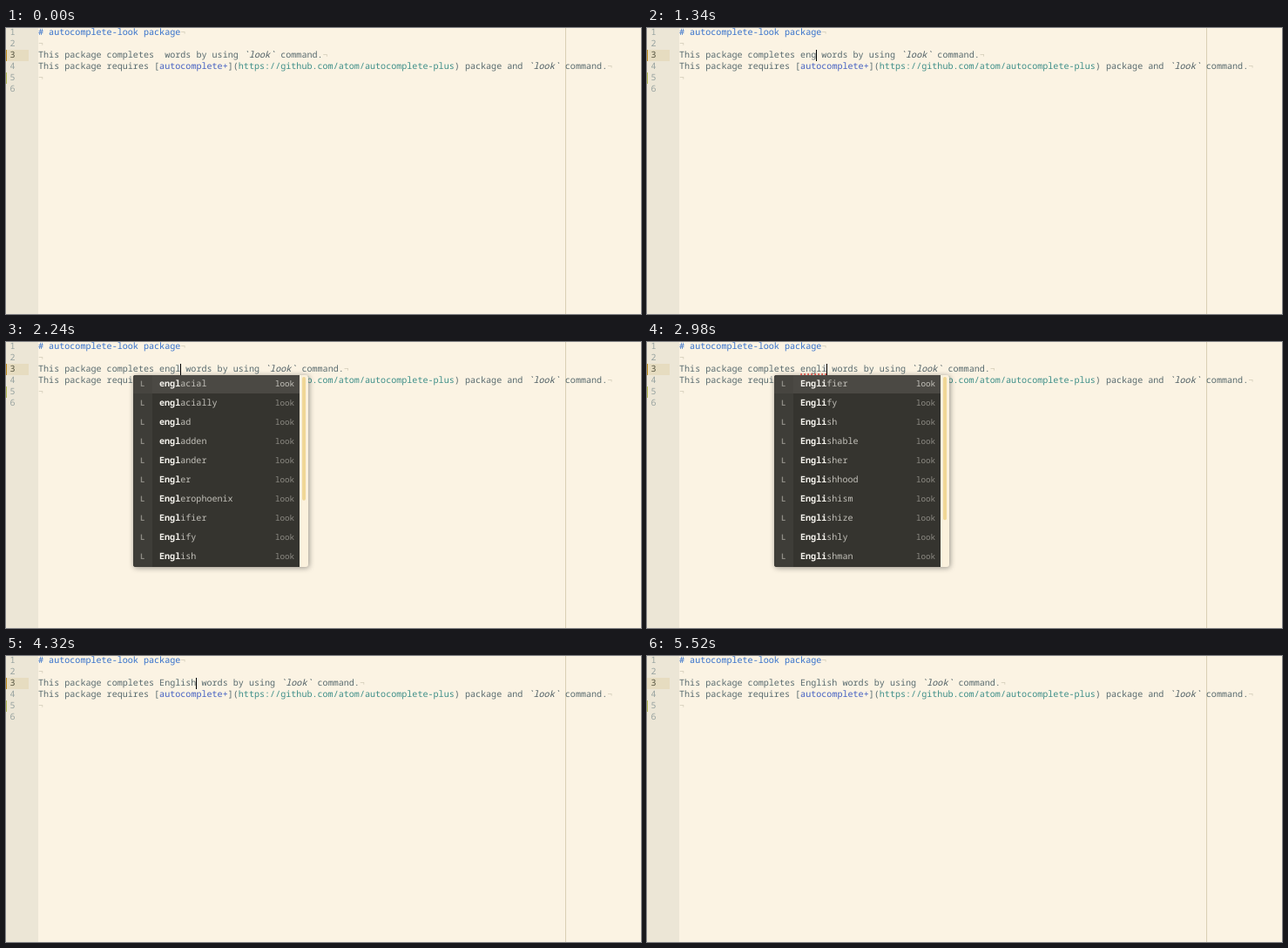
Animation, 729 px wide and 328 px high, one loop 5620 ms. Source, as an HTML page with a canvas:

```html
<!DOCTYPE html>
<html lang="en">
<head>
<meta charset="utf-8">
<title>autocomplete-look</title>
<style>
  html, body { margin: 0; width: 729px; height: 328px; overflow: hidden; background: #fbf3e3; }
  canvas { display: block; }
</style>
</head>
<body>
<canvas id="stage" width="729" height="328"></canvas>
<script>
const ctx = document.getElementById("stage").getContext("2d");

const LOOP = 5620;
const FAMILY = '"Noto Sans Mono", "DejaVu Sans Mono", monospace';
const SIZE = 10.08;
const CELL = SIZE * 0.6;
const LEFT = 37;
const ROW = 13;
const WORD_COLUMN = 23;

const COLOR = {
  page: "#fbf3e3", gutter: "#ece6d6", activeGutter: "#e6dcc0", guide: "#d9cfb4",
  text: "#586a6e", code: "#4b5b61", heading: "#3470cb", link: "#4460c2", url: "#3d8e88",
  invisible: "#d0cab6", number: "#98a3a0", activeNumber: "#55543f",
  modified: "#bd8d20", added: "#b3b954", error: "#d8443c",
  popup: "#35342f", icons: "#3e3d38", selected: "#4b4944", selectedIcon: "#474540",
  match: "#f4f2ec", item: "#c3c1ba", dim: "#8d8b84", selectedDim: "#c6c4bd",
  track: "#fbf1dd", thumb: "#f0d796"
};

// Each entry: time, text typed so far.
const TYPING = [[0, ""], [450, "e"], [750, "en"], [1340, "eng"], [2240, "engl"],
  [2680, "engli"], [3430, "englis"], [4320, "English"]];
const CURSOR_OFF = [[0, 450], [1790, 2240], [3130, 3430], [3870, 4320], [4770, 5070], [5520, LOOP]];
const MISSPELLED = [[1640, 2240], [2530, 2680], [2980, 3430], [3730, 4320]];
const POPUP = [[1490, 4320]];
const SAVED_AT = 4620;

const ENGLISH = ["", "able", "er", "hood", "ism", "ize", "ly", "man", "ness", "ry"].map(s => "English" + s);
const SUGGESTIONS = {
  eng: { total: 15, words: ["engage", "engaged", "engagedly", "engagedness", "engagement",
    "engager", "engaging", "engagingly", "engagingness", "engaol"] },
  engl: { total: 15, words: ["englacial", "englacially", "englad", "engladden", "Englander",
    "Engler", "Englerophoenix", "Englifier", "Englify", "English"] },
  engli: { total: 13, words: ["Englifier", "Englify", ...ENGLISH.slice(0, 8)] },
  englis: { total: 11, words: ENGLISH }
};

const within = (ranges, t) => ranges.some(([from, to]) => t >= from && t < to);
const columnX = column => LEFT + column * CELL;
const rowTop = row => row * ROW - 14;

function rect(color, x, y, w, h) {
  ctx.fillStyle = color;
  ctx.fillRect(x, y, w, h);
}

function write(text, x, y, color, style = "", size = SIZE) {
  ctx.font = `${style} ${size}px ${FAMILY}`;
  ctx.fillStyle = color;
  ctx.fillText(text, x, y);
}

// Writes [text, color, style] runs and closes the line with an end-of-line mark.
function writeLine(row, ...runs) {
  let column = 0;
  for (const [text, color, style] of [...runs, ["¬", COLOR.invisible]]) {
    write(text, columnX(column), rowTop(row) + 9, color, style);
    column += text.length;
  }
}

function drawGutter(saved) {
  rect(COLOR.gutter, 0, 0, LEFT, 328);
  rect(COLOR.activeGutter, 0, rowTop(3), 26, ROW);
  if (!saved) rect(COLOR.modified, 0, rowTop(3), 1, ROW);
  rect(COLOR.added, 0, rowTop(5), 1, ROW);
  for (let row = 1; row <= 6; row++) {
    write(String(row), 4.5, rowTop(row) + 9, row === 3 ? COLOR.activeNumber : COLOR.number);
  }
}

function drawText(word) {
  const { text, code, heading, link, url } = COLOR;
  writeLine(1, ["# autocomplete-look package", heading]);
  writeLine(2);
  writeLine(3, [`This package completes ${word} words by using `, text],
    ["`look`", code, "italic"], [" command.", text]);
  writeLine(4, ["This package requires [", text], ["autocomplete+", link], ["](", text],
    ["https://github.com/atom/autocomplete-plus", url], [") package and ", text],
    ["`look`", code, "italic"], [" command.", text]);
  writeLine(5);
}

function drawUnderline(length) {
  ctx.strokeStyle = COLOR.error;
  ctx.lineWidth = 2;
  ctx.lineCap = "round";
  ctx.setLineDash([0, 4]);
  ctx.beginPath();
  ctx.moveTo(columnX(WORD_COLUMN) + 1, 37);
  ctx.lineTo(columnX(WORD_COLUMN + length) - 1, 37);
  ctx.stroke();
}

function drawPopup(word) {
  const { total, words } = SUGGESTIONS[word];
  const x = 146, y = 38, w = 201, h = 220, step = 22;

  ctx.save();
  ctx.beginPath();
  ctx.roundRect(x, y, w, h, 3);
  ctx.shadowColor = "rgba(0, 0, 0, 0.4)";
  ctx.shadowBlur = 6;
  ctx.shadowOffsetX = 1;
  ctx.shadowOffsetY = 1;
  ctx.fillStyle = COLOR.track;
  ctx.fill();
  ctx.shadowColor = "transparent";
  ctx.clip();

  rect(COLOR.popup, x, y, 191, h);
  rect(COLOR.icons, x, y, 22, h);
  rect(COLOR.selected, x, y, 191, 21);
  rect(COLOR.selectedIcon, x, y, 22, 21);

  words.forEach((entry, i) => {
    const base = 51 + i * step;
    const split = word.length;
    write("L", 154, base, COLOR.dim, "bold", 9);
    write(entry.slice(0, split), 176, base, COLOR.match, "bold");
    write(entry.slice(split), 176 + split * CELL, base, COLOR.item);
    write("look", 309, base, i ? COLOR.dim : COLOR.selectedDim, "", 9.2);
  });

  const thumbEnd = 35 + h * 10 / total;
  ctx.fillStyle = COLOR.thumb;
  ctx.beginPath();
  ctx.roundRect(340, 40, 4, thumbEnd - 40, 2);
  ctx.fill();
  ctx.restore();
}

function draw(t) {
  const word = TYPING.findLast(([start]) => t >= start)[1];
  ctx.textRendering = "geometricPrecision";
  rect(COLOR.page, 0, 0, 729, 328);
  drawGutter(t >= SAVED_AT);
  rect(COLOR.guide, 642, 0, 1, 328);
  drawText(word);
  if (within(POPUP, t)) drawPopup(word);
  if (within(MISSPELLED, t)) drawUnderline(word.length);
  if (!within(CURSOR_OFF, t)) {
    rect("#000", Math.floor(columnX(WORD_COLUMN + word.length)), rowTop(3), 1, ROW);
  }
}

function tick() {
  draw(performance.now() % LOOP);
  requestAnimationFrame(tick);
}
tick();
</script>
</body>
</html>
```
